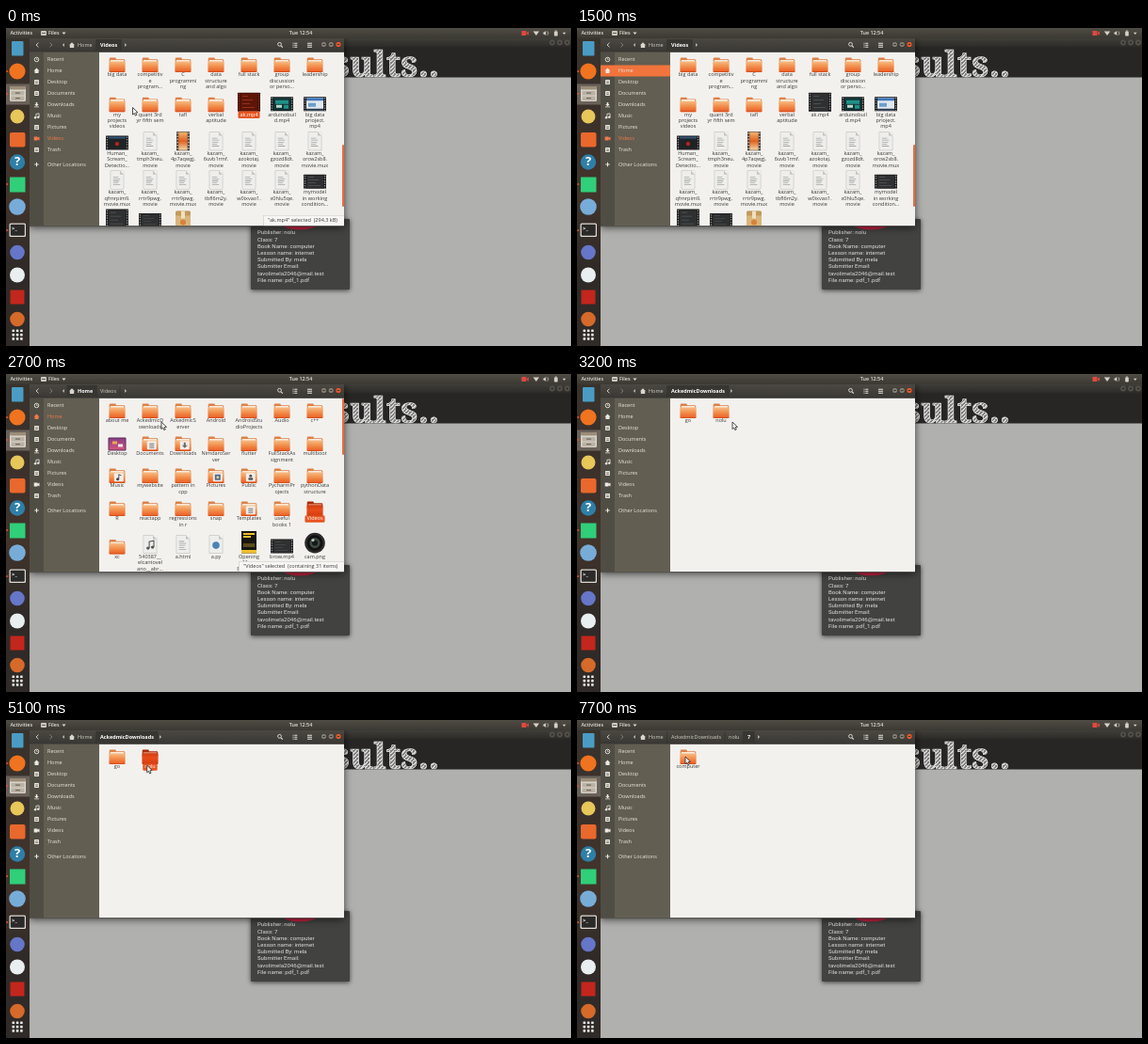
Write an HTML page with a canvas that moves like this. It is 600x338 px and loops after 8000 ms.

```html
<!DOCTYPE html>
<html>
<head>
<meta charset="utf-8">
<style>
  html, body { margin: 0; width: 100%; height: 100%; overflow: hidden; background: #b0b0ae; }
  canvas { display: block; width: 600px; height: 338px; }
</style>
</head>
<body>
<canvas></canvas>
<script>
const LOOP = 8000, STEP = 100;
const UI = '"Open Sans", "Noto Sans", sans-serif';
const ORANGE = '#e95420';
const canvas = document.querySelector('canvas');
const c = canvas.getContext('2d');
const ratio = window.devicePixelRatio || 1;
canvas.width = 600 * ratio;
canvas.height = 338 * ratio;

// Folder contents: rows of "kind:label", lines split by "|"; a bare label is a folder.
// "rows" holds the height of each row's first label line.
const videos = {
  rows: [50, 92.2, 133.6, 174.8, 216],
  thumb: [124, 66],
  items: `big data,competitiv|e|program...,C|programmi|ng,data|structure|and algo,full stack,group|discussion|or perso...,leadership
my|projects|videos,quant 3rd|yr fifth sem,tafl,verbal|aptitude,film:ak.mp4,teal:arduinobuil|d.mp4,screen:big data|prioject.|mp4
red:Human_|Scream_|Detectio...,doc:kazam_|tmph3neu.|movie,strip:kazam_|4p7aqwgj.|movie,doc:kazam_|6uvb1rmf.|movie,doc:kazam_|azokotaj.|movie,doc:kazam_|gzozd8dt.|movie,doc:kazam_|orcw2sb8.|movie.mux
doc:kazam_|qfmrpim9.|movie.mux,doc:kazam_|rrtr9pwg.|movie,doc:kazam_|rrtr9pwg.|movie.mux,doc:kazam_|tbfl6m2y.|movie,doc:kazam_|w0ixvao1.|movie,doc:kazam_|x0hlu5qe.|movie,wide:mymodel|in working|condition...
film:,wide:,box:`
};
const home = {
  rows: [50, 85, 119, 154, 194.5],
  thumb: [26, 60],
  items: `about me,AckedmicD|ownloads,AckedmicS|erver,Android,AndroidStu|dioProjects,Audio,c++
desktop:Desktop,paper:Documents,down:Downloads,NimdaroSer|ver,flutter,FullStackAs|signment,multiboot
note:Music,mywebsite,pattern in|cpp,photo:Pictures,person:Public,PycharmPr|ojects,pythonData|structure
R,reactapp,regressions|in r,snap,paper:Templates,useful|books 1,Videos
xc,song:540387__|elcantovel|ano__abr...,doc:a.html,py:a.py,book:Opening|Maze|Builders...,wide:brow.mp4,lens:cam.png`
};
const small = items => ({ rows: [50], items });
const downloads = small('go,nolu'), publisher = small('7'), classDir = small('computer');
for (const view of [videos, home, downloads, publisher, classDir])
  view.grid = view.items.split('\n').map(row => row.split(',').map(item => {
    const [kind, label] = item.includes(':') ? item.split(':') : ['folder', item];
    return { kind, lines: label.split('|') };
  }));

// Cursor tip: time, x, y
const path = [
  [100, 134.5, 84.5], [900, 60, 43], [1500, 60, 43], [1700, 130.5, 41.5], [1800, 130.5, 41.5],
  [2700, 165, 51], [3400, 165, 51], [4000, 118.5, 50.5], [4200, 149, 44], [4900, 149, 44],
  [5400, 151, 56], [5900, 149, 44], [6200, 149, 44], [6900, 115, 39], [8000, 115, 39]
];

function rect(x, y, w, h, fill, r = 0) {
  c.fillStyle = fill;
  c.beginPath();
  c.roundRect(x, y, w, h, r);
  c.fill();
}
function disc(x, y, r, fill) {
  c.fillStyle = fill;
  c.beginPath();
  c.arc(x, y, r, 0, 7);
  c.fill();
}
function ring(x, y, r, color) {
  c.strokeStyle = color;
  c.lineWidth = 0.9;
  c.beginPath();
  c.arc(x, y, r, 0, 7);
  c.stroke();
}
function line(points, color, width = 0.9) {
  c.strokeStyle = color;
  c.lineWidth = width;
  c.beginPath();
  points.forEach(([x, y]) => c.lineTo(x, y));
  c.stroke();
}
function poly(points, fill) {
  c.fillStyle = fill;
  c.beginPath();
  points.forEach(([x, y]) => c.lineTo(x, y));
  c.fill();
}
function text(s, x, y, { size = 5.5, color = '#e4e1da', align = 'left', weight = 400, font = UI } = {}) {
  c.font = `${weight} ${size}px ${font}`;
  c.textAlign = align;
  c.textBaseline = 'middle';
  c.fillStyle = color;
  c.fillText(s, x, y);
}
function blend(y0, y1, ...colors) {
  const g = c.createLinearGradient(0, y0, 0, y1);
  colors.forEach((color, i) => g.addColorStop(i / (colors.length - 1), color));
  return g;
}
function shadowed(blur, draw) {
  c.save();
  c.shadowColor = 'rgba(0,0,0,.65)';
  c.shadowBlur = blur * ratio;
  c.shadowOffsetY = ratio;
  draw();
  c.restore();
}

const hatch = document.createElement('canvas');
hatch.width = hatch.height = 4;
{
  const h = hatch.getContext('2d');
  h.fillStyle = '#808080';
  h.fillRect(0, 0, 4, 4);
  h.fillStyle = '#e2e2e2';
  for (let i = 0; i < 4; i++) h.fillRect(i, 3 - i, 1.7, 1);
}

function page() {
  rect(0, 0, 600, 338, '#b0b0ae');
  rect(25, 11, 575, 41.5, '#272625');
  rect(25, 11, 575, 9.5, blend(11, 20.5, '#403e38', '#2b2a27'));
  c.font = '700 38px "Noto Serif", serif';
  c.textAlign = 'right';
  c.textBaseline = 'alphabetic';
  c.fillStyle = c.createPattern(hatch, 'repeat');
  c.fillText('Results..', 460, 51.5);
  c.strokeStyle = '#efefef';
  c.lineWidth = 0.7;
  c.strokeText('Results..', 460, 51.5);
  for (const x of [580, 588, 596]) {
    disc(x, 15.5, 2.9, '#55524b');
    disc(x, 15.5, 1.2, '#33312d');
  }

  shadowed(5, () => rect(260, 203, 105, 75, '#424240', 1));
  c.fillStyle = '#c8213f';
  c.beginPath();
  c.ellipse(312, 208, 19, 6.3, 0, 0, 7);
  c.fill();
  ['Publisher: nolu', 'Class: 7', 'Book Name: computer', 'Lesson name: internet', 'Submitted By: mela',
    'Submitter Email:', 'tavolimela2046@mail.test', 'File name: pdf_1.pdf']
    .forEach((s, i) => text(s, 267, 217.7 + i * 7.2, { size: 6.1, font: 'Roboto, sans-serif', color: '#dededc' }));
}

function topBar() {
  rect(0, 0, 600, 11, blend(0, 11, '#4f4c44', '#3b3933'));
  const w = { weight: 600, size: 5.4 };
  text('Activities', 4.5, 5.5, w);
  rect(37, 3, 6, 5, '#cfcac0', 1);
  rect(38, 5, 4, 1, '#6b665d');
  text('Files', 45, 5.5, w);
  poly([[59.5, 4.5], [63.5, 4.5], [61.5, 7]], '#ddd');
  text('Tue 12:54', 313, 5.5, { ...w, align: 'center' });
  rect(547.5, 3, 5, 5, '#e0483e', 0.6);
  poly([[552.5, 5.5], [555, 3.3], [555, 7.7]], '#e0483e');
  poly([[559.8, 3.5], [566.2, 3.5], [563, 8]], '#d6d2ca');
  poly([[570.5, 4.5], [571.5, 4.5], [573.3, 3], [573.3, 8], [571.5, 6.5], [570.5, 6.5]], '#d6d2ca');
  line([[575, 3.5], [575.9, 5.5], [575, 7.5]], '#d6d2ca', 0.7);
  rect(582.2, 3.4, 3.6, 5, '#d6d2ca', 0.6);
  rect(583.2, 2.6, 1.6, 1, '#d6d2ca');
  poly([[591, 4.7], [594.6, 4.7], [592.8, 7]], '#d6d2ca');
}

function dock() {
  rect(0, 11, 25, 327, blend(11, 338, '#38332d', '#3b302a', '#42352c', '#2f2a27', '#302b28'));
  rect(0, 59.5, 25, 22, '#6a625a');
  for (const y of [46, 70, 166, 215]) disc(1.2, y, 1, ORANGE);

  rect(6, 14, 12.5, 15.5, '#4a9cc4', 1);
  disc(12, 46, 8.6, '#f0731f');
  rect(4, 62, 17, 16, '#d9d4c9', 1.5);
  rect(4, 62, 17, 3.5, '#9c8d78', 1.5);
  rect(5.5, 67, 14, 4.5, '#b9b1a3');
  rect(5.5, 72.5, 14, 4.5, '#b9b1a3');
  rect(10, 68.5, 5, 1.2, '#6f675b');
  rect(10, 74, 5, 1.2, '#6f675b');
  disc(12, 94, 7.5, '#e7c65a');
  rect(4, 111, 16.5, 15.5, '#e9682c', 2);
  disc(12, 142.5, 8.2, '#2e7fa8');
  text('?', 12, 143, { size: 13, weight: 700, align: 'center', color: '#fff' });
  rect(4, 158.5, 16.5, 16, '#30cf79');
  disc(12, 190, 8.8, '#78acd8');
  rect(3.5, 207.5, 17.5, 14.5, '#dedbd4', 1.5);
  rect(4.8, 208.8, 15, 12, '#2b2a28', 0.8);
  text('>_', 6, 213, { size: 6, weight: 700, color: '#fff' });
  disc(12, 238.5, 7.8, '#6676c8');
  disc(12, 262.5, 8, '#e9eef0');
  rect(4.5, 278.5, 15, 15, '#c3261c');
  disc(12, 309.5, 7.8, '#d56a2a');
  for (let i = 0; i < 9; i++) rect(6.5 + i % 3 * 4.3, 320.5 + (i / 3 | 0) * 4.3, 2.6, 2.6, '#ecebe8', 0.6);
}

function folder(x, y, hot) {
  const front = hot ? blend(y - 6, y + 8, '#c9380f', '#e84c18', '#d13a10')
    : blend(y - 5, y + 7, '#f8c490', '#f2924f', '#ea5f26');
  const back = hot ? '#a52c0b' : '#dd8148';
  rect(x - 8.2, y - 8, 7, 4, back, 1);
  rect(x - 8.2, y - 6.3, 16.4, 6, back, 1);
  rect(x - 7.2, y - 5.6, 14.4, 4, hot ? '#d87a58' : '#f8ead8');
  rect(x - 8.6, y - 4, 17.2, 11.5, front, 1);
  line([[x - 7.8, y + 7], [x + 7.8, y + 7]], hot ? '#96270a' : '#d24a18', 0.7);
}
function film(x, y, height, inner, hot) {
  const top = y - height / 2;
  rect(x - 12, top, 24, height, hot ? '#3a0d04' : '#151515', 0.5);
  for (let dy = 0.9; dy < height - 1; dy += 2.6)
    for (const dx of [-11.3, 9.8]) rect(x + dx, top + dy, 1.5, 1.5, hot ? '#8c3118' : '#8d8d8d');
  rect(x - 9, top + 0.8, 18, height - 1.6, inner);
}
function codeFilm(x, y, height, hot) {
  film(x, y, height, hot ? '#5e1507' : '#2f3031', hot);
  for (let i = 0; i < 4; i++)
    rect(x - 7, y + (i - 1.7) * height / 5, 6 + i * 37 % 8, 0.7, hot ? '#a33a20' : '#55585a');
}
function sheet(x, y) {
  rect(x - 7.3, y - 10, 14.6, 20, '#b9b9b6', 0.8);
  rect(x - 6.8, y - 9.5, 13.6, 19, '#eeeeec', 0.6);
  poly([[x + 3, y - 10], [x + 7.4, y - 10], [x + 7.4, y - 5.6]], '#f2f1ee');
  poly([[x + 3, y - 9.7], [x + 7, y - 5.6], [x + 3, y - 5.6]], '#c4c4c1');
}
const emblems = {
  paper: (x, y) => { for (let i = 0; i < 3; i++) rect(x - 2.5, y - 2 + i * 2, 5, 0.9, '#777'); },
  down: (x, y) => poly([[x - 1, y - 3], [x + 1, y - 3], [x + 1, y], [x + 3, y], [x, y + 3], [x - 3, y], [x - 1, y]], '#6a6a6a'),
  note: (x, y) => { disc(x - 1.2, y + 2, 1.5, '#444'); line([[x, y + 2], [x, y - 3], [x + 2.5, y - 2]], '#444'); },
  photo: (x, y) => { rect(x - 3, y - 3, 6, 6, '#4f6d86'); disc(x, y, 1.5, '#d9c8a0'); },
  person: (x, y) => { disc(x, y - 1.5, 1.5, '#555'); rect(x - 2.5, y + 0.5, 5, 2.5, '#555', 1); }
};
// Low icons sit close above their label, tall ones start higher
const lowIcons = {
  folder,
  wide: (x, y) => codeFilm(x, y - 1, 15),
  teal: (x, y) => {
    film(x, y - 1, 15, '#123536');
    rect(x - 7, y - 5, 14, 4, '#1f9187');
    rect(x - 6, y, 6, 3, '#b9d8ca');
    rect(x + 2, y, 5, 4, '#1f9187');
  },
  screen: (x, y) => {
    film(x, y - 1, 15, '#dfe8ef');
    rect(x - 9, y - 7.5, 18, 3, '#3d74b5');
    rect(x - 7, y - 2, 8, 4, '#6d9dcb');
    rect(x - 9, y + 4, 18, 2, '#2a3b52');
  },
  red: (x, y) => {
    film(x, y - 1, 15, '#202326');
    rect(x - 9, y - 7.5, 18, 2, '#32567a');
    disc(x, y, 2.2, '#b3261e');
  },
  desktop: (x, y) => {
    rect(x - 9.5, y - 7, 19, 14, '#5d2a5d', 1);
    rect(x - 8.5, y - 6, 17, 12, blend(y - 6, y + 6, '#8a3f86', '#d2567a'));
    rect(x - 5, y - 3, 5, 3, '#f0a64e');
    rect(x + 1, y, 5, 3, '#efe6ee');
  }
};
for (const kind in emblems) lowIcons[kind] = (x, y, hot) => {
  folder(x, y, hot);
  rect(x - 3.2, y - 3.2, 10, 9, '#efedea', 1);
  emblems[kind](x + 1.8, y + 1.3);
};
const tallIcons = {
  film: (x, y, hot) => codeFilm(x, y, 20, hot),
  strip: (x, y) => {
    rect(x - 7, y - 10, 14, 20, '#3a322b');
    rect(x - 4.7, y - 9.5, 9.4, 19, blend(y - 9, y + 9, '#f0b06a', '#e2601f', '#f0d0a0'));
    for (let i = 0; i < 6; i++) for (const dx of [-6.5, 5.2]) rect(x + dx, y - 9 + i * 3.2, 1.3, 1.6, '#d8d0c4');
  },
  doc: (x, y) => {
    sheet(x, y);
    for (let i = 0; i < 5; i++) rect(x - 4.2, y - 3.5 + i * 2.1, 5.5 + i * 2 % 3, 0.8, '#a5a5a2');
  },
  song: (x, y) => {
    sheet(x, y);
    disc(x - 2.2, y + 4, 1.7, '#555');
    disc(x + 2.6, y + 3, 1.7, '#555');
    line([[x - 0.9, y + 4], [x - 0.9, y - 3], [x + 4, y - 4], [x + 4, y + 3]], '#555', 1.1);
  },
  py: (x, y) => { sheet(x, y); disc(x, y + 1, 3.8, '#4b83b5'); },
  book: (x, y) => {
    rect(x - 8, y - 14, 16, 23.5, '#17150f');
    rect(x - 6, y - 12, 12, 1.8, '#efc02a');
    rect(x - 6, y - 9, 8, 1.8, '#efc02a');
    rect(x - 6, y - 1, 12, 4, '#5d4b1a');
    rect(x - 8, y + 6, 16, 3.5, '#efc02a');
  },
  lens: (x, y) => {
    y -= 1.5;
    disc(x, y, 10.8, '#2b2b2b');
    disc(x, y, 8.4, '#111');
    disc(x, y, 5.6, '#3c4a41');
    disc(x, y, 3, '#15191b');
    disc(x - 2, y - 3, 1.6, '#b9c3b4');
  },
  box: (x, y) => {
    rect(x - 8, y - 8, 16, 18, '#d9b57c', 1.5);
    rect(x - 8, y - 8, 16, 5, '#c49a5c', 1.5);
    rect(x - 2, y - 8, 4, 8, '#efe0bf');
    disc(x, y + 4, 3, '#d8823a');
  }
};

function grid(view, selected) {
  view.grid.forEach((row, r) => row.forEach(({ kind, lines }, col) => {
    const x = 118 + col * 35, y = view.rows[r], hot = lines.join('') === selected;
    if (lowIcons[kind]) lowIcons[kind](x, y - 10.5, hot);
    else tallIcons[kind](x, y - 13.4, hot);
    if (hot) {
      c.font = `5.5px ${UI}`;
      const w = Math.max(...lines.map(s => c.measureText(s).width)) + 4;
      rect(x - w / 2, y - 3.8, w, lines.length * 6.4 + 1.2, ORANGE, 1.5);
    }
    lines.forEach((s, i) => text(s, x, y + i * 6.4, { align: 'center', color: hot ? '#fff' : '#3a3a38' }));
  }));
  if (view.thumb) rect(357, view.thumb[0], 2, view.thumb[1], '#ec6a39', 1);
}

function headerBar(crumbs, active) {
  rect(25, 11, 334, 14.5, blend(11, 25, '#4b4842', '#3a3834'));
  line([[25, 25.3], [359, 25.3]], '#2c2a27', 0.7);
  line([[34.5, 15.7], [32, 18], [34.5, 20.3]], '#dcd8ce');
  line([[46.5, 15.7], [49, 18], [46.5, 20.3]], '#85817a');
  poly([[62, 16], [62, 20], [59.8, 18]], '#b5b1a8');
  crumbs.forEach(([name, x], i) => {
    const weight = i === active ? 700 : 400;
    c.font = `${weight} 5.5px ${UI}`;
    const left = i ? x - 4 : 64.5, right = x + c.measureText(name).width + 4;
    if (i === active) rect(left, 12, right - left, 13, '#383631');
    line([[right, 12], [right, 25]], '#33312d', 0.6);
    text(name, x, 18.3, { weight, color: i === active ? '#fff' : '#d3cfc5' });
  });
  poly([[67, 18.2], [70, 15.2], [73, 18.2], [72.2, 18.2], [72.2, 21], [67.8, 21], [67.8, 18.2]], '#d9d5cb');
  const tip = crumbs[crumbs.length - 1][2];
  poly([[tip - 1, 16], [tip - 1, 20], [tip + 1.2, 18]], '#b5b1a8');

  ring(290.5, 17.3, 1.9, '#e4e1da');
  line([[292, 18.8], [293.8, 20.6]], '#e4e1da', 1.1);
  for (let i = 0; i < 3; i++) {
    rect(304.5, 15.8 + i * 2, 1, 1, '#e4e1da');
    rect(306.3, 15.8 + i * 2, 3, 1, '#e4e1da');
    rect(320, 15.8 + i * 2, 5, 0.9, '#e4e1da');
  }
  for (const [x, color] of [[337.5, '#807c72'], [345.2, '#807c72'], [353, '#e8582a']]) {
    disc(x, 17.5, 3.1, '#2e2c28');
    disc(x, 17.5, 2.7, color);
    rect(x - 1.2, 17, 2.4, 1, '#3a3732');
  }
}

const page2 = (x, y, color) => {
  rect(x - 2.4, y - 2.6, 4.8, 5.2, color, 0.6);
  rect(x - 1.3, y - 0.9, 2.6, 0.7, '#504d44');
  rect(x - 1.3, y + 0.7, 2.6, 0.7, '#504d44');
};
const placeIcons = {
  Recent: (x, y, color) => { ring(x, y, 2.3, color); line([[x, y - 1.5], [x, y], [x + 1.3, y]], color, 0.6); },
  Home: (x, y, color) => poly([[x - 3, y], [x, y - 3], [x + 3, y], [x + 2, y], [x + 2, y + 2.6], [x - 2, y + 2.6], [x - 2, y]], color),
  Desktop: page2,
  Documents: page2,
  Downloads: (x, y, color) => {
    poly([[x - 0.8, y - 2.6], [x + 0.8, y - 2.6], [x + 0.8, y - 0.5], [x + 2.3, y - 0.5], [x, y + 1.8], [x - 2.3, y - 0.5], [x - 0.8, y - 0.5]], color);
    rect(x - 2.5, y + 2, 5, 0.8, color);
  },
  Music: (x, y, color) => {
    disc(x - 1.4, y + 1.7, 1.2, color);
    disc(x + 1.8, y + 1.2, 1.2, color);
    line([[x - 0.6, y + 1.7], [x - 0.6, y - 2.2], [x + 2.6, y - 2.6], [x + 2.6, y + 1]], color, 0.8);
  },
  Pictures: page2,
  Videos: (x, y, color) => poly([[x - 2.8, y - 2], [x + 1, y - 2], [x + 1, y - 0.8], [x + 3, y - 2], [x + 3, y + 2], [x + 1, y + 0.8], [x + 1, y + 2], [x - 2.8, y + 2]], color),
  Trash: page2,
  'Other Locations': (x, y, color) => { rect(x - 2.2, y - 0.5, 4.4, 1, color); rect(x - 0.5, y - 2.2, 1, 4.4, color); }
};
function places(current, press) {
  rect(25, 25.5, 15, 185, '#504d44');
  rect(40, 25.5, 59, 185, '#625e51');
  if (press) rect(25, 39.5, 74, 12, `rgba(240,116,60,${press})`);
  Object.entries(placeIcons).forEach(([name, icon], i) => {
    const y = i === 9 ? 145 : 33.5 + i * 12;
    const color = name === current ? '#f2784b' : '#ebe8e0';
    icon(32.5, y, color);
    text(name, 44, y + 0.2, { color });
  });
}

function status(message, x) {
  rect(x, 199, 359 - x, 11.5, '#c9c7c2', 1);
  rect(x + 0.6, 199.6, 358.4 - x, 10.9, '#f7f6f4', 1);
  text(message, x + 5, 205, { color: '#3a3a38' });
}

function cursor(t) {
  if (t >= 1000 && t < 1600) return;
  const next = path.findIndex(p => p[0] > t);
  let [, x, y] = path[Math.max(next - 1, 0)];
  if (next > 0) {
    const [t0, x0, y0] = path[next - 1], [t1, x1, y1] = path[next];
    const k = (t - t0) / (t1 - t0), e = k * k * (3 - 2 * k);
    x = x0 + (x1 - x0) * e;
    y = y0 + (y1 - y0) * e;
  }
  const shape = [[0, 0], [0, 7.6], [1.8, 6.1], [2.9, 8.7], [4.3, 8], [3.2, 5.5], [5.5, 5.3], [0, 0]]
    .map(([dx, dy]) => [x + dx, y + dy]);
  poly(shape, '#f4f4f4');
  line(shape, '#2a2a2a', 0.8);
}

// Each crumb: name, text x, x of the arrow that follows
const root = ['Home', 76, 95];
const deep = [root, ['AckedmicDownloads', 100, 164], ['nolu', 161, 181], ['7', 181, 193]];
const shallow = [root, ['Videos', 100, 127]];
function scene(t) {
  if (t < 1600) return { view: videos, crumbs: shallow, active: 1, place: 'Videos', selected: t < 500 && 'ak.mp4' };
  if (t < 3100) return { view: home, crumbs: shallow, active: 0, place: 'Home', selected: t < 3000 ? 'Videos' : 'AckedmicDownloads' };
  if (t < 6200) return { view: downloads, crumbs: deep.slice(0, 2), active: 1, selected: t >= 4600 && 'nolu' };
  if (t < 7300) return { view: publisher, crumbs: deep.slice(0, 3), active: 2, selected: t >= 7100 && '7' };
  return { view: classDir, crumbs: deep, active: 3 };
}

function render(t) {
  const { view, crumbs, active, place, selected } = scene(t);
  c.setTransform(ratio, 0, 0, ratio, 0, 0);
  page();
  shadowed(8, () => rect(25, 11, 334, 199.5, '#f2f1ee'));
  c.save();
  c.beginPath();
  c.rect(25, 11, 334, 199.5);
  c.clip();
  grid(view, selected);
  places(place, t < 1600 ? Math.min(1, Math.max(0, (t - 1200) / 300)) : 0);
  headerBar(crumbs, active);
  if (t < 500) status('"ak.mp4" selected  (294.3 kB)', 273);
  if (t >= 2200 && t < 3000) status('"Videos" selected  (containing 31 items)', 247);
  c.restore();
  line([[25, 210.6], [359, 210.6]], '#3c3a36', 0.8);
  dock();
  topBar();
  cursor(t);
}

const start = performance.now();
function tick() {
  const t = (performance.now() - start) % LOOP;
  render(Math.floor(t / STEP) * STEP);
  requestAnimationFrame(tick);
}
tick();
</script>
</body>
</html>
```
